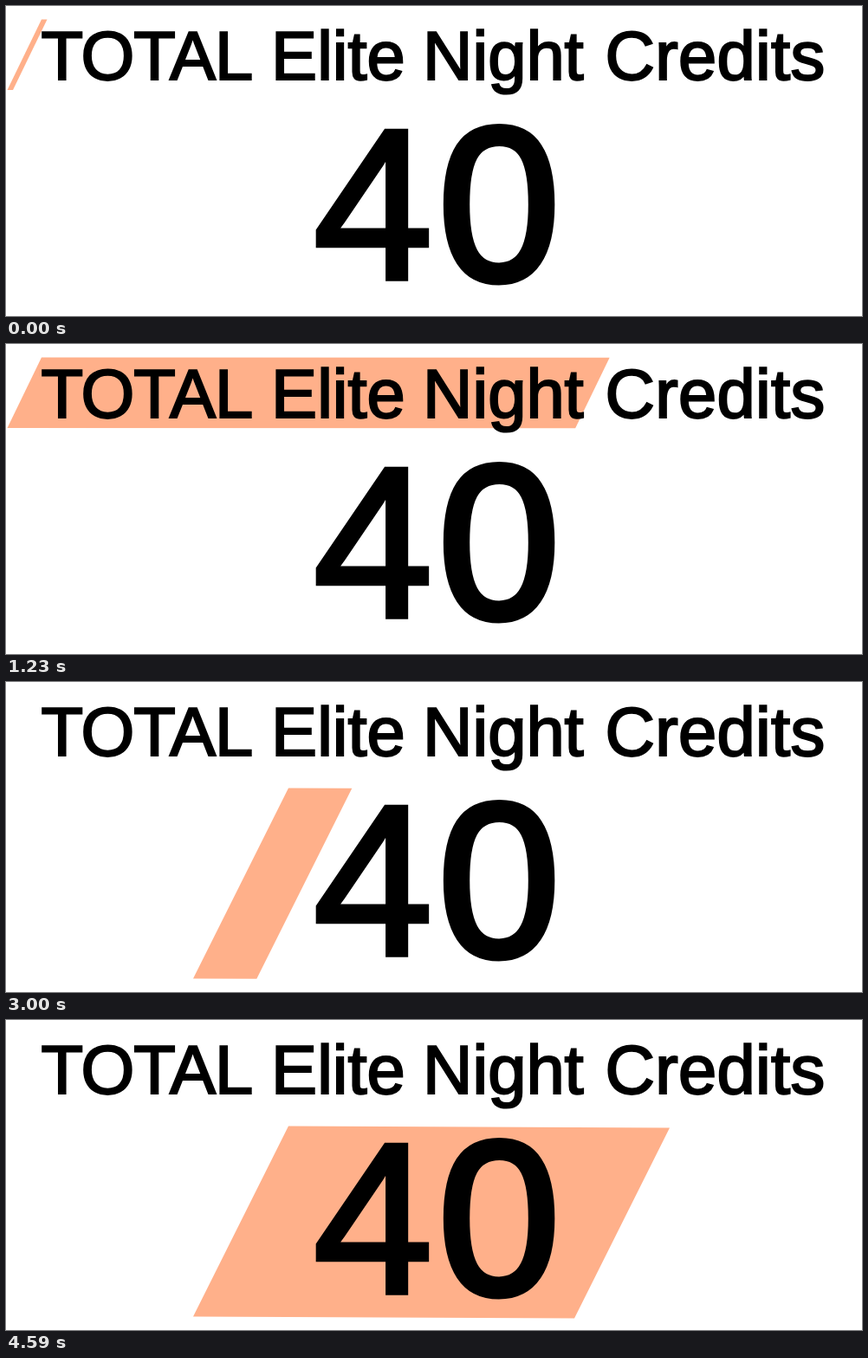
These frames come from a looping animation (988x358 px, 5.1 s). An HTML page with a canvas:

```html
<!DOCTYPE html>
<html lang="en">
<head>
<meta charset="utf-8">
<title>Elite Night Credits</title>
<style>
  html, body { margin: 0; width: 100%; height: 100%; overflow: hidden; background: #fff; }
  canvas { display: block; }
</style>
</head>
<body>
<canvas id="stage" width="988" height="358"></canvas>
<script>
const ctx = document.getElementById('stage').getContext('2d');
const LOOP = 5100, STEP = 30, SWEEP = 1950, SECOND = 2550;

// Slanted marker strokes; drop is how far the right end sinks at full width.
const titleMark = { left: 41, foot: 1.5, top: 15.5, bottom: 97, from: 6.5, to: 943.5, drop: 0.5 };
const numberMark = { left: 326, foot: 216, top: 122.5, bottom: 342.5, from: 15.5, to: 440, drop: 2 };

function ease(t) {
  const p = Math.min(t / SWEEP, 1);
  return 0.9 * (1 - Math.cos(Math.PI * p)) / 2 + 0.1 * p;
}

function drawMark(m, t) {
  const w = m.from + (m.to - m.from) * ease(t);
  const dy = m.drop * w / m.to;
  ctx.fillStyle = '#ffb08a';
  ctx.beginPath();
  ctx.moveTo(m.left, m.top);
  ctx.lineTo(m.left + w, m.top + dy);
  ctx.lineTo(m.foot + w, m.bottom + dy);
  ctx.lineTo(m.foot, m.bottom);
  ctx.fill();
}

// Medium-weight text whose ink starts at x.
function drawText(text, x, y, size, weight, spacing = 0) {
  ctx.font = `${size}px "Liberation Sans", Arial, sans-serif`;
  ctx.letterSpacing = spacing + 'px';
  ctx.lineWidth = weight;
  const start = x + weight / 2 + ctx.measureText(text).actualBoundingBoxLeft;
  ctx.fillText(text, start, y);
  ctx.strokeText(text, start, y);
}

function draw(t) {
  ctx.fillStyle = '#fff';
  ctx.fillRect(0, 0, 988, 358);
  if (t < SECOND) drawMark(titleMark, t);
  else drawMark(numberMark, t - SECOND);

  ctx.fillStyle = ctx.strokeStyle = '#000';
  ctx.lineJoin = 'miter';
  ctx.miterLimit = 3;
  ctx.textRendering = 'geometricPrecision';
  drawText('TOTAL', 40.3, 84.7, 79.5, 2.2, -1);
  drawText('Elite', 311, 84.7, 79.5, 2.2);
  drawText('Night', 486, 84.7, 79.5, 2.2);
  drawText('Credits', 694.5, 84.7, 79.5, 2.2, 0.3);
  drawText('4', 357, 315, 248, 5.5);
  drawText('0', 504, 316.3, 252, 8);
}

const begin = performance.now();
function tick() {
  const t = (performance.now() - begin) % LOOP;
  draw(Math.floor(t / STEP) * STEP);
  requestAnimationFrame(tick);
}
tick();
</script>
</body>
</html>
```
